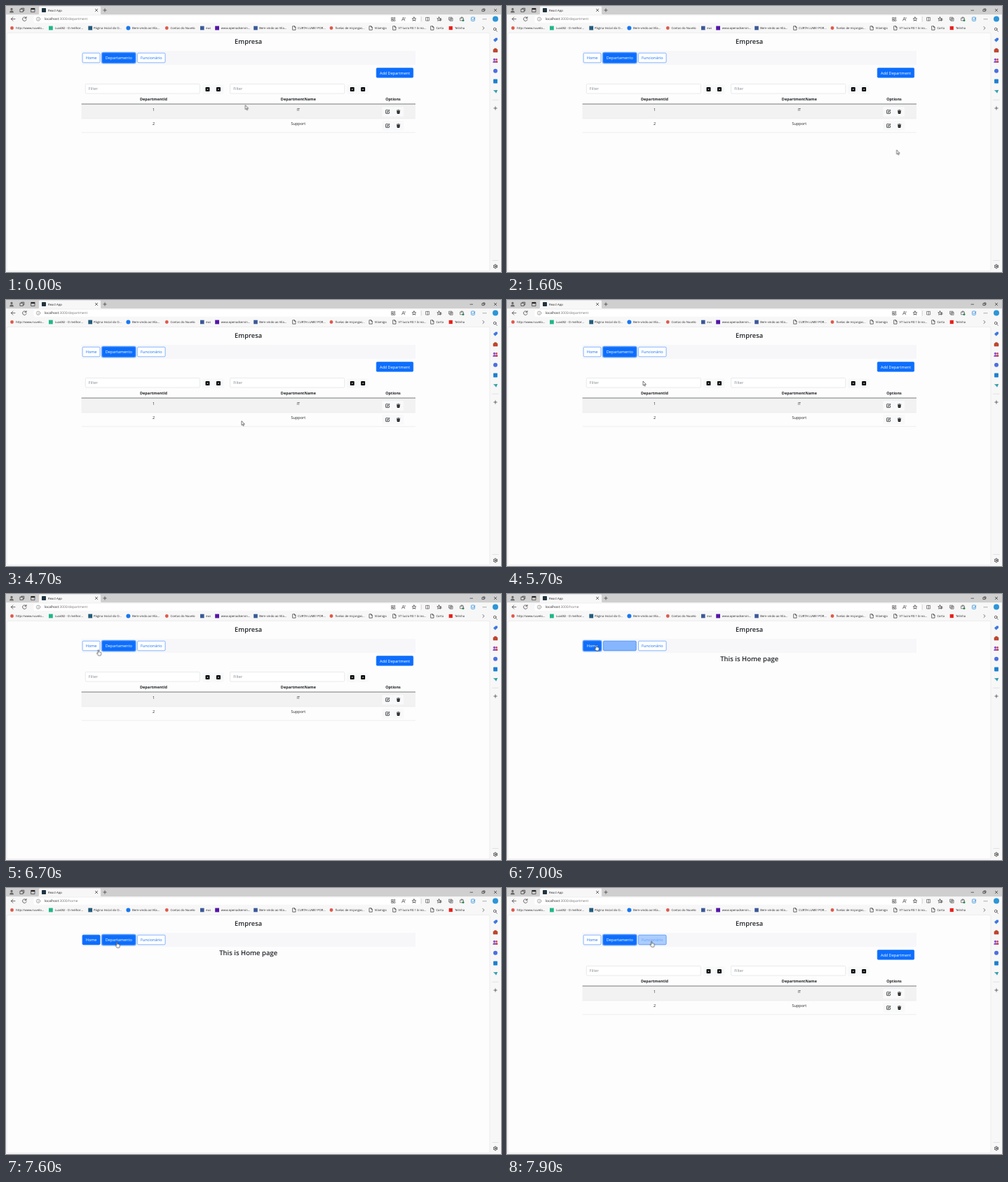
An HTML page for the animation above (8000 ms loop, 706x380 px).

```html
<!DOCTYPE html>
<html lang="pt">
<head>
<meta charset="utf-8">
<title>React App</title>
<style>
html, body { margin: 0; width: 100%; height: 100%; overflow: hidden; background: #f7f7f7; }
svg { display: block; width: 100%; height: 100%; }
text { font-family: "Open Sans", "Noto Sans", sans-serif; font-size: 5.55px; fill: #212529; text-rendering: geometricPrecision; }
.small text { font-size: 4.25px; fill: #222; }
.mid { text-anchor: middle; }
.head text { font-weight: 700; font-size: 5.5px; }
.title { font-weight: 600; font-size: 9.3px; }
.url { font-size: 4.85px; fill: #777; }
.url .host { fill: #222; }
.hint { fill: #80868c; }
.line { fill: none; stroke: #333; stroke-width: .7; stroke-linecap: round; stroke-linejoin: round; }
.btn rect { fill: #fff; stroke: #0d6efd; stroke-width: .5; }
.btn text { fill: #0d6efd; text-anchor: middle; }
.btn .on rect { fill: #0d6efd; }
.btn .on text { fill: #fff; }
.btn .ring { fill: none; stroke: #0d6efd; stroke-opacity: .55; stroke-width: 1.5; }
.field { fill: #fff; stroke: #ced4da; stroke-width: .5; }
.soft { fill: #f8f9fa; }

/* one loop is 8 s, so 1.25% is a tenth of a second */
.anim { animation: 8s step-end -.005s infinite; }
.dept { animation-name: dept; }
.home { animation-name: home; }
.home-on { animation-name: home-on; }
.home-ring { animation-name: home-ring; }
.dept-on { animation-name: dept-on; }
.dept-ring { animation-name: dept-ring; }
.func-on { animation-name: func-on; }
.pointer { animation-name: move; }
.arrow { animation-name: arrow; }
.hand { animation-name: hand; }

@keyframes dept { 0%, 96.25%, 100% { opacity: 1 } 87.5% { opacity: 0 } }
@keyframes home { 0%, 96.25%, 100% { opacity: 0 } 87.5% { opacity: 1 } }
@keyframes home-on { 0%, 97.5%, 100% { opacity: 0 } 85% { opacity: 1 } 96.25% { opacity: .5 } }
@keyframes home-ring { 0%, 95%, 100% { opacity: 0 } 86.25% { opacity: 1 } }
@keyframes dept-on { 0%, 93.75%, 100% { opacity: 1 } 87.5% { opacity: .5 } 88.75% { opacity: 0 } 92.5% { opacity: .4 } }
@keyframes dept-ring { 0%, 95%, 100% { opacity: 1 } 86.25% { opacity: 0 } }
@keyframes func-on { 0%, 100% { opacity: 0 } 98.75% { opacity: .34 } }
@keyframes arrow { 0%, 71.25%, 100% { opacity: 1 } 67.5%, 83.75% { opacity: 0 } }
@keyframes hand { 0%, 71.25%, 100% { opacity: 0 } 67.5%, 83.75% { opacity: 1 } }
@keyframes move {
  0%, 100% { transform: translate(341.3px, 141.6px) }
  18.75% { transform: translate(470px, 182px) }
  20% { transform: translate(555.7px, 205.6px) }
  43.75% { transform: translate(546px, 210px) }
  45% { transform: translate(522px, 217px) }
  46.25% { transform: translate(512.3px, 217.6px) }
  51.25% { transform: translate(380px, 186px) }
  52.5% { transform: translate(290.3px, 165.4px) }
  58.75% { transform: translate(336px, 172.7px) }
  60% { transform: translate(333.6px, 171.8px) }
  66.25% { transform: translate(250px, 122px) }
  67.5% { transform: translate(164px, 73.3px) }
  68.75% { transform: translate(168px, 74.3px) }
  71.25% { transform: translate(194px, 116px) }
  72.5% { transform: translate(206.4px, 140.2px) }
  78.75% { transform: translate(202.4px, 163.6px) }
  83.75% { transform: translate(131.7px, 79.8px) }
  85% { transform: translate(128px, 75px) }
  86.25% { transform: translate(127.2px, 72.9px) }
  92.5% { transform: translate(145px, 75px) }
  93.75% { transform: translate(158.3px, 77.2px) }
  97.5% { transform: translate(186px, 76.6px) }
  98.75% { transform: translate(206.2px, 76.2px) }
}
</style>
</head>
<body>
<svg viewBox="0 0 706 380" preserveAspectRatio="none">
  <defs>
    <path id="doc" class="line" d="M-1.9-2.7H.5L2-1.2V2.7H-1.9ZM.5-2.7V-1.2H2"/>
    <g id="down">
      <rect x="-7.7" y="-7" width="15.4" height="14" rx="1.5" class="soft"/>
      <rect x="-2.95" y="-2.95" width="5.9" height="5.9" rx=".8" fill="#000"/>
      <path d="M-1.4-.6H1.4L0 1.1Z" fill="#fff"/>
    </g>
    <g id="up">
      <rect x="-7.7" y="-7" width="15.4" height="14" rx="1.5" class="soft"/>
      <rect x="-2.95" y="-2.95" width="5.9" height="5.9" rx=".8" fill="#000"/>
      <path d="M-1.4.6H1.4L0-1.1Z" fill="#fff"/>
    </g>
    <g id="tools">
      <rect x="536.4" y="-7" width="15.4" height="14" rx="1.5" class="soft"/>
      <rect x="551.8" y="-7" width="15.4" height="14" rx="1.5" class="soft"/>
      <path class="line" style="stroke:#111" d="M544.3-2.4H542.2Q541.6-2.4 541.6-1.8V2Q541.6 2.6 542.2 2.6H546Q546.6 2.6 546.6 2V.2M543.5.8L543.9-.5 546.3-2.9 547.2-2 544.8.4Z"/>
      <path d="M557-2.3H558.7L559-2.8H560.2L560.5-2.3H562.2V-1.5H557ZM557.4-1.1H561.8L561.5 2.3Q561.4 2.9 560.8 2.9H558.4Q557.8 2.9 557.7 2.3Z" fill="#111"/>
      <path d="M558.8-.4V2M559.6-.4V2M560.4-.4V2" stroke="#bbb" stroke-width=".25"/>
    </g>
    <path id="star" class="line" d="M0-2.8L.8-.9 2.8-.8 1.3.6 1.8 2.6 0 1.5-1.8 2.6-1.3.6-2.8-.8-.8-.9Z"/>
    <path id="plus" class="line" d="M-2.2 0H2.2M0-2.2V2.2"/>
    <path id="cross" class="line" d="M-1.7-1.7L1.7 1.7M1.7-1.7L-1.7 1.7"/>
  </defs>

  <!-- window frame -->
  <rect width="706" height="380" fill="#f7f7f7"/>
  <rect width="706" height="12.2" fill="#cfcfcf"/>
  <path d="M45.5 12.3Q47 12.2 47 10.8V2Q47 .5 48.5.5H133.5Q135 .5 135 2V10.8Q135 12.2 136.5 12.3Z" fill="#f7f7f7"/>
  <g fill="#666"><circle cx="8" cy="4.4" r="1.6"/><path d="M5.2 9.4Q5.2 6.6 8 6.6T10.8 9.4Z"/></g>
  <path class="line" d="M20.3 4.4H24.3V8.4H20.3ZM21.8 4.2V3.2H25.8V7H24.5M36 3.4H41V8.6H36Z"/>
  <rect x="35.8" y="3.2" width="5.4" height="2" fill="#222"/>
  <rect x="51" y="3" width="6" height="6" rx=".8" fill="#20343f"/>
  <g class="small"><text x="60" y="7.6">React App</text></g>
  <use href="#cross" x="129" y="6"/>
  <use href="#plus" x="141" y="6"/>
  <path class="line" d="M662 6.2H665.6M679.3 4.9H682V7.6H679.3ZM680.3 4.7V4H683V6.7H682.2"/>
  <use href="#cross" x="698" y="6"/>

  <!-- toolbar -->
  <rect x="39.5" y="13.9" width="551" height="9.8" rx="2" fill="#fff"/>
  <path class="line" d="M12.9 18.6H7.4M9.9 16L7.3 18.6 9.9 21.2M28.8 17.2A2.8 2.8 0 1 0 29.1 19.4M29 15.5V17.4H27"/>
  <g class="line" style="stroke:#666;stroke-width:.5"><circle cx="46" cy="18.7" r="2.7"/><path d="M46 18.4V20.2M46 17.1V17.2"/></g>
  <g class="anim dept"><text class="url" x="54.8" y="20.4"><tspan class="host">localhost</tspan>:3000/department</text></g>
  <g class="anim home" opacity="0"><text class="url" x="54.8" y="20.4"><tspan class="host">localhost</tspan>:3000/home</text></g>
  <g class="line" style="stroke-width:.55">
    <path d="M550 16.5H552V18.5H550ZM550 19.4H552V21.4H550ZM553 19.4H555V21.4H553ZM554 16V18.4M552.8 17.2H555.2"/>
    <path d="M564.5 21L566.6 16 568.7 21M565.3 19.3H567.9M569 16.2Q570 17.2 569 18.2"/>
    <path d="M599 16.4H603.6V21H599ZM601.3 16.4V21M632 16.2H635.8V20H632ZM633 20V21.3H637.1V17.3H635.8M632.9 18.1H635M633.9 17.1V19.1"/>
    <path d="M648 17.2H652.5V20.8H648ZM649 17.2V16H651.2V17.2"/>
    <path d="M592.3 15.5V22" stroke="#bbb"/>
  </g>
  <g stroke-width=".6"><use href="#star" x="582" y="18.7"/><use href="#star" x="617.6" y="18.7"/></g>
  <path d="M619.2 18.9H621M618.8 20.2H621" class="line"/>
  <circle cx="652" cy="20.6" r="1.5" fill="#2f8a55"/>
  <rect x="663.5" y="16" width="5" height="5.4" rx="1" fill="#e4f1fc" stroke="#2587d4" stroke-width=".7"/>
  <path d="M665 18.7L666 19.8 668.9 16.8" fill="none" stroke="#2587d4" stroke-width=".8"/>
  <g fill="#333"><circle cx="680.6" cy="18.7" r=".5"/><circle cx="682.6" cy="18.7" r=".5"/><circle cx="684.6" cy="18.7" r=".5"/></g>
  <circle cx="698" cy="18.6" r="4" fill="#2b96d8"/>

  <!-- bookmarks -->
  <g fill="#e0574a"><circle cx="8.5" cy="31.5" r="2.4"/><circle cx="229.3" cy="31.5" r="2.4"/><circle cx="464" cy="31.5" r="2.4"/></g>
  <rect x="61" y="28.6" width="5.8" height="5.8" fill="#22b788"/>
  <rect x="117.3" y="28.6" width="5.8" height="5.8" fill="#245c7c"/>
  <circle cx="174.4" cy="31.5" r="3" fill="#1877f2"/>
  <rect x="277" y="28.7" width="5.6" height="5.6" fill="#3b5998"/>
  <rect x="298.2" y="28.6" width="5.8" height="5.8" fill="#5415a8"/>
  <rect x="353.2" y="28.7" width="5.6" height="5.6" fill="#3b5998"/>
  <rect x="631.7" y="28.9" width="5.2" height="5.2" fill="#e8201c"/>
  <use href="#doc" x="411" y="31.5"/><use href="#doc" x="520.3" y="31.5"/>
  <use href="#doc" x="554" y="31.5"/><use href="#doc" x="608" y="31.5"/>
  <g class="small">
    <text x="14" y="33">http://www.nuvelo...</text>
    <text x="69.8" y="33">Lua482 - O melhor...</text>
    <text x="125" y="33">Página Inicial do O...</text>
    <text x="180" y="33">Bem-vindo ao Vila...</text>
    <text x="234.5" y="33">Contas do Nuvelo</text>
    <text x="285.3" y="33">eus</text>
    <text x="306.8" y="33">www.openadservin...</text>
    <text x="361.2" y="33">Bem-vindo ao Vila...</text>
    <text x="416" y="33">CURTA LUME! POR...</text>
    <text x="469.8" y="33">fivelas de miçangas...</text>
    <text x="525.8" y="33">Vilamigo</text>
    <text x="559.4" y="33">V7 lucra R$ 1 bi no...</text>
    <text x="613.4" y="33">Carta</text>
    <text x="640" y="33">Telinha</text>
  </g>
  <path class="line" d="M680 29.5L682 31.5 680 33.5"/>

  <!-- sidebar -->
  <g class="line"><circle cx="697.2" cy="33" r="1.8"/><path d="M698.6 34.5L700.4 36.3"/></g>
  <path d="M695 48.6L698.4 45.4 701 45.8 701 48.4 697.6 51.6Z" fill="#3b78e0"/>
  <path d="M695 62H701V66H695ZM696.6 62V60.7H699.4V62" fill="#c8442c" stroke="#9c3422" stroke-width=".5"/>
  <circle cx="696.5" cy="76.3" r="1.6" fill="#8a4bc2"/><path d="M694.4 81Q694.4 78.2 696.5 78.2T698.8 81Z" fill="#8a4bc2"/>
  <circle cx="699.6" cy="76.4" r="1.3" fill="#c0395a"/><path d="M698.2 81V78.4H701.2V81Z" fill="#c0395a"/>
  <circle cx="698" cy="92.7" r="3" fill="#4a6fe0"/>
  <rect x="695.1" y="104.6" width="5.8" height="5.8" rx=".6" fill="#1a7fd0"/>
  <path d="M694.8 120.4L701.2 120 699 124.8 697.6 122.6Z" fill="#2b9aa8"/>
  <path d="M693.5 134.2H702.5M693.5 363.5H702.5" stroke="#ccc" stroke-width=".5"/>
  <use href="#plus" x="698" y="146"/>
  <g class="line"><circle cx="698" cy="372" r="2.4"/><circle cx="698" cy="372" r=".9"/><path d="M698 369V369.4M698 374.6V375M695.4 370.5L695.7 370.7M700.3 373.3L700.6 373.5M695.4 373.5L695.7 373.3M700.3 370.7L700.6 370.5"/></g>

  <!-- page -->
  <rect x="1.2" y="38.4" width="688.8" height="340" rx="2" fill="#fdfdfd" stroke="#dedede" stroke-width=".5"/>
  <text class="title mid" x="345.6" y="54.4">Empresa</text>
  <rect x="107.6" y="64.2" width="476.4" height="19.9" fill="#f7f7fa"/>
  <g class="btn">
    <rect x="109.1" y="67.2" width="24.9" height="13.7" rx="1.4"/>
    <text x="121.5" y="76.2">Home</text>
    <g class="on anim home-on" opacity="0">
      <rect x="109.1" y="67.2" width="24.9" height="13.7" rx="1.4"/>
      <text x="121.5" y="76.2">Home</text>
    </g>
    <rect class="ring anim home-ring" opacity="0" x="108.3" y="66.4" width="26.5" height="15.3" rx="2"/>
  </g>
  <g class="btn">
    <rect x="137.4" y="67.2" width="46.8" height="13.7" rx="1.4"/>
    <text x="160.8" y="76.2">Departamento</text>
    <g class="on anim dept-on">
      <rect x="137.4" y="67.2" width="46.8" height="13.7" rx="1.4"/>
      <text x="160.8" y="76.2">Departamento</text>
    </g>
    <rect class="ring anim dept-ring" x="136.6" y="66.4" width="48.4" height="15.3" rx="2"/>
  </g>
  <g class="btn">
    <rect x="187.4" y="67.2" width="39.7" height="13.7" rx="1.4"/>
    <text x="207.2" y="76.2">Funcionário</text>
    <g class="on anim func-on" opacity="0">
      <rect x="187.4" y="67.2" width="39.7" height="13.7" rx="1.4"/>
      <text x="207.2" y="76.2">Funcionário</text>
    </g>
  </g>

  <g class="anim home" opacity="0">
    <text class="title mid" style="font-size:9.5px" x="345.7" y="95.6">This is Home page</text>
  </g>

  <g class="anim dept">
    <g class="btn"><g class="on">
      <rect x="528.2" y="88.6" width="52.6" height="13.7" rx="1.4"/>
      <text x="554.5" y="97.7">Add Department</text>
    </g></g>
    <rect class="field" x="113.3" y="111.4" width="163.2" height="13.6" rx="1.4"/>
    <rect class="field" x="319.6" y="111.4" width="163.2" height="13.6" rx="1.4"/>
    <text class="hint" x="117.8" y="120.3">Filter</text>
    <text class="hint" x="324.2" y="120.3">Filter</text>
    <use href="#down" x="287.5" y="119"/><use href="#up" x="303" y="119"/>
    <use href="#down" x="493.8" y="119"/><use href="#up" x="509.2" y="119"/>
    <g class="head mid">
      <text x="210.5" y="134.8">DepartmentId</text>
      <text x="416.9" y="134.8">DepartmentName</text>
      <text x="552" y="134.8">Options</text>
    </g>
    <rect x="107.6" y="140" width="476.4" height="20.7" fill="#f2f2f2"/>
    <path d="M107.6 140H584" stroke="#4d5154" stroke-width=".75"/>
    <path d="M107.6 160.8H584M107.6 180.7H584" stroke="#dee2e6" stroke-width=".5"/>
    <g class="mid">
      <text x="210.5" y="149.8">1</text><text x="416.9" y="149.8">IT</text>
      <text x="210.5" y="170">2</text><text x="416.9" y="170">Support</text>
    </g>
    <use href="#tools" y="151"/><use href="#tools" y="171"/>
  </g>

  <g class="anim pointer" fill="#fff" stroke="#111" stroke-width=".55" stroke-linejoin="round">
    <path class="anim arrow" d="M0 0V6.1L1.4 4.9 2.4 7.1 3.4 6.7 2.4 4.5H4.4Z"/>
    <path class="anim hand" opacity="0" d="M-.7.6Q-.7 0 0 0T.7.6V3Q1.6 2.6 1.9 3.2 2.8 2.9 3 3.5 4 3.4 4 4.3V5.8Q4 7.2 3.2 8.1H-.1Q-.7 7.1-1.7 5.9-2.6 4.8-1.9 4.4-1.4 4.2-.7 5Z"/>
  </g>
</svg>
</body>
</html>
```
